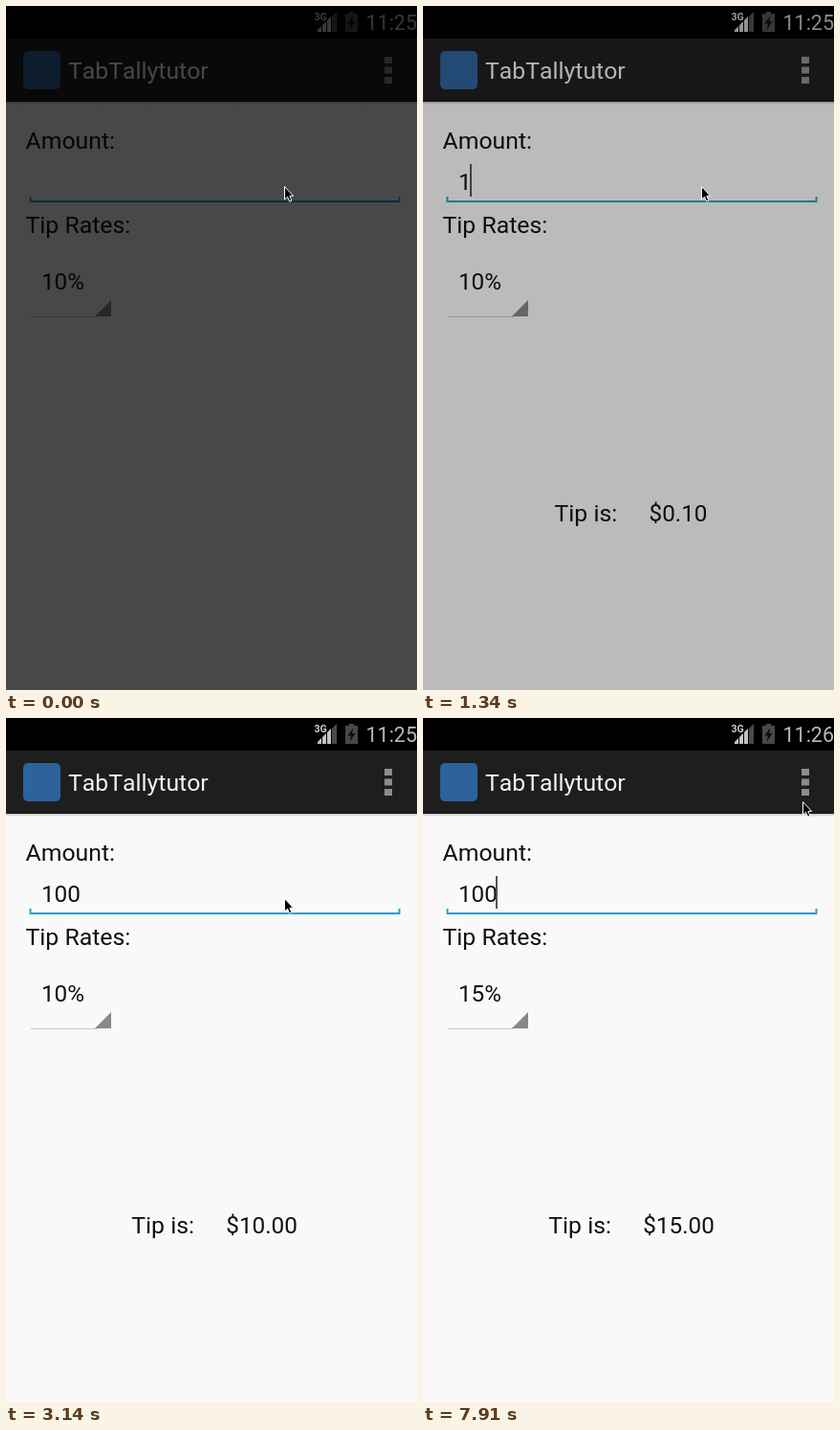
An HTML page that plays this animation: 430 by 714 pixels, repeating every 8000 ms.

```html
<!DOCTYPE html>
<html lang="en">
<head>
<meta charset="utf-8">
<title>TabTallytutor</title>
<style>
  html, body { margin: 0; width: 100%; height: 100%; overflow: hidden; background: #000; }
  svg { display: block; width: 100%; height: 100%; }
  text { font-family: Roboto, sans-serif; font-kerning: none; white-space: pre; }
  .label { font-size: 24.8px; fill: #111; }
  .value { font-size: 24.3px; fill: #111; }
  .item { font-size: 21px; fill: #111; }
</style>
</head>
<body>
<svg viewBox="0 0 430 714">
  <defs>
    <linearGradient id="edge" x1="0" y1="0" x2="0" y2="1">
      <stop offset="0" stop-color="#000" stop-opacity=".28"/>
      <stop offset="1" stop-color="#000" stop-opacity="0"/>
    </linearGradient>
    <filter id="shadow" x="-20%" y="-10%" width="140%" height="120%">
      <feDropShadow dx="0" dy="4" stdDeviation="3.2" flood-opacity=".6"/>
    </filter>
  </defs>

  <rect width="430" height="714" fill="#f9f9f9"/>
  <rect y="99" width="430" height="4" fill="url(#edge)"/>
  <rect width="430" height="100" fill="#1e1e1e"/>
  <rect width="430" height="34" fill="#000"/>

  <rect x="18" y="47" width="39" height="40" rx="5" fill="#2d639b"/>
  <text x="65" y="76" font-size="24.8" fill="#f3f3f3">TabTallytutor</text>
  <path d="M396 53h8v7h-8zM396 63.5h8v7h-8zM396 74h8v7h-8z" fill="#8c8c8c"/>
  <path d="M326 27V25L330 21V27ZM331 27V20L335 16V27ZM336 27V15L340 11V27Z" fill="#c4c4c4"/>
  <path d="M341 27V11L346 6V27Z" fill="#4a4a4a"/>
  <text x="322.5" y="15" font-size="10.5" font-weight="700" fill="#d0d0d0">3G</text>
  <path d="M359 6h5v2h4v19h-13v-19h4z" fill="#484848"/>
  <path d="M363.5 10L357.5 18.5H361L359.5 25L365.5 16H362Z" fill="#0c0c0c"/>
  <text id="clock" x="376.5" y="25" font-size="21.5" fill="#b9b9b9"></text>

  <text class="label" x="20.5" y="149">Amount:</text>
  <text class="label" x="20.5" y="237">Tip Rates:</text>
  <text class="value" id="amount" x="36.9" y="192"></text>
  <rect id="caret" y="165" width="2" height="34" fill="#555"/>
  <path id="focus" d="M25.5 199V204H411.5V199" fill="none"/>
  <text class="value" id="rate" x="36.9" y="295.5"></text>
  <path d="M26 324.5H95" stroke="#c6c6c6"/>
  <path d="M110 307V324H93Z" fill="#888"/>
  <g id="tip">
    <text class="label" x="137.5" y="538">Tip is:</text>
    <text class="value" id="tipValue" x="236.5" y="538"></text>
  </g>
  <rect id="dim" width="430" height="714" fill="#000"/>

  <g id="menu">
    <rect x="25" y="330" width="85" height="200" rx="2" fill="#ebebeb" filter="url(#shadow)"/>
    <rect id="pressed" x="25" y="397" width="85" height="67" fill="#7cc8e4"/>
    <path d="M25 396.5H110M25 463.5H110" stroke="#d0d0d0"/>
    <text class="item" x="36.8" y="371.5">10%</text>
    <text class="item" x="36.8" y="438.5">15%</text>
    <text class="item" x="36.8" y="505.5">20%</text>
  </g>

  <path id="mouse" d="M.5 .5V14L3.5 11.2L5.7 16.2L7.9 15.2L5.8 10.3H9.6Z"
        fill="#000" stroke="#fff" stroke-width="1" stroke-linejoin="round"/>
</svg>
<script>
const LOOP = 8000, TICK = 149.2;
const el = id => document.getElementById(id);
const set = (id, attrs) => {
  for (const key in attrs) el(id).setAttribute(key, attrs[key]);
};
const within = (n, from, to) => n >= from && n < to;

// Pointer stops: tick, x, y
const stops = [
  [0, 291, 188], [21, 291, 188], [28, 88, 300], [31, 87, 301], [35, 55, 423],
  [36, 54, 430], [44, 54, 430], [47, 307, 336], [50, 307, 336], [53, 397, 87]
];
const caretOn = [[4, 13], [17, 21], [24, 28], [31, 42], [45, 49], [52, 60]];
const fade = [0.58, 0.42, 0.25, 0.08];

function pointer(n) {
  const i = stops.findIndex(s => s[0] > n);
  if (i < 0) return stops[stops.length - 1].slice(1);
  const [t0, x0, y0] = stops[i - 1], [t1, x1, y1] = stops[i];
  const u = (n - t0) / (t1 - t0), e = u * u * (3 - 2 * u);
  return [x0 + (x1 - x0) * e, y0 + (y1 - y0) * e];
}

function draw(time) {
  const n = Math.floor(time / TICK + 0.03);

  const amount = n < 7 ? '' : n < 17 ? '1' : n < 18 ? '10' : '100';
  const rate = n < 39 ? 10 : 15;
  const tip = '$' + (amount * rate / 100).toFixed(2);
  el('amount').textContent = amount;
  el('rate').textContent = rate + '%';
  el('tipValue').textContent = tip;
  el('clock').textContent = n < 32 ? '11:25' : '11:26';
  set('tip', {
    visibility: amount ? 'visible' : 'hidden',
    transform: `translate(${-6.25 * (tip.length - 5)} 0)`
  });

  const blink = caretOn.some(([from, to]) => within(n, from, to));
  set('caret', {
    x: 36 + Math.round(13.4 * amount.length),
    visibility: blink ? 'visible' : 'hidden'
  });

  set('dim', { opacity: n < 7 ? 0.71 : fade[n - 7] || 0 });

  const blurred = within(n, 31, 39);
  set('focus', {
    stroke: blurred ? '#c4c4c4' : '#2c9dc9',
    'stroke-width': blurred ? 1.2 : 2
  });
  set('menu', { opacity: n === 30 || n === 39 ? 0.5 : blurred ? 1 : 0 });
  set('pressed', { opacity: n === 38 ? 1 : 0 });

  const [x, y] = pointer(n);
  set('mouse', { transform: `translate(${Math.round(x)} ${Math.round(y)})` });
}

const start = performance.now();
function frame() {
  draw((performance.now() - start) % LOOP);
  requestAnimationFrame(frame);
}
frame();
</script>
</body>
</html>
```
